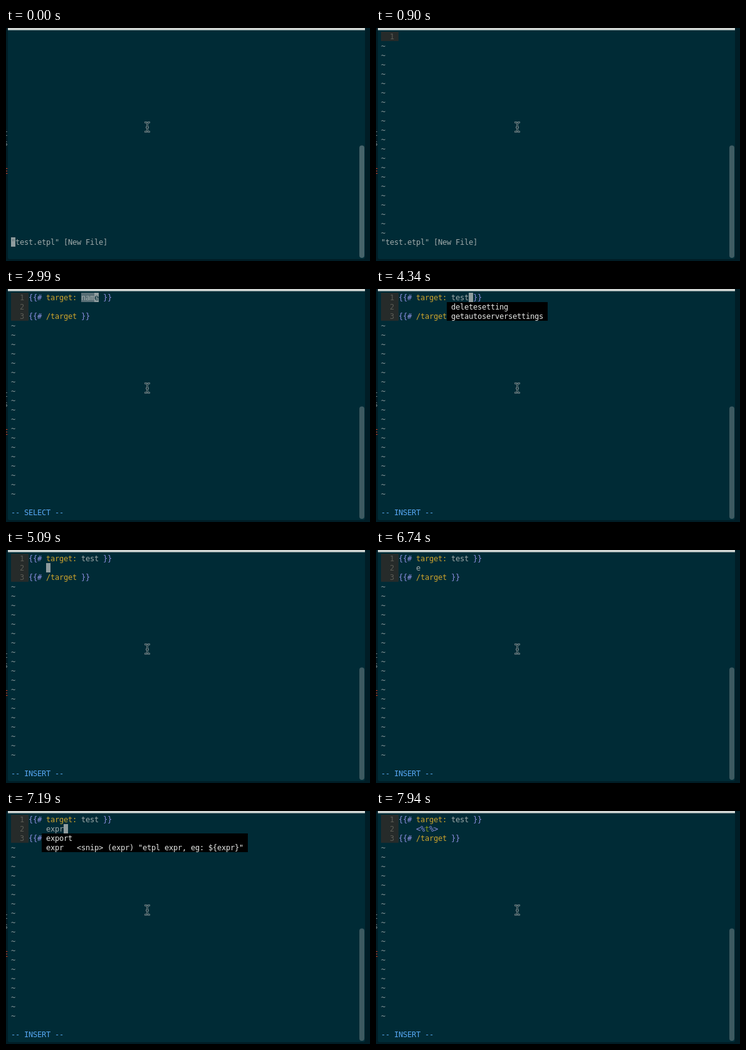
Recreate the animation shown at these times as an HTML page. Size 581 px wide and 374 px high, loop 8000 ms.

```html
<!DOCTYPE html>
<html lang="en">
<head>
<meta charset="utf-8">
<title>Template snippets in the editor</title>
<style>
  html, body { margin: 0; width: 100%; height: 100%; overflow: hidden; background: #001d26; }
  svg { display: block; }
  text { font: 12px "DejaVu Sans Mono", "Liberation Mono", monospace; white-space: pre; }
</style>
</head>
<body>
<svg width="581" height="374" viewBox="0 0 581 374">
  <rect width="581" height="374" fill="#001d26"/>
  <g fill="#75878a">
    <text x="-4" y="173">t</text>
    <text x="-4" y="189">s</text>
    <text x="-4" y="234" fill="#cb4023">E</text>
  </g>
  <path d="M3 0H573V368Q573 371 570 371H6Q3 371 3 368Z" fill="#002b36"/>
  <rect x="3" width="570" height="3.5" fill="#d2d8d5"/>
  <g id="screen"></g>
  <rect id="bar" x="564" y="188.5" width="8" height="180.5" rx="4"/>
  <g fill="none" stroke-linecap="square">
    <path id="beam" d="M222.5 151.5H224L225.5 153L227 151.5H228.5M225.5 153V165M222.5 166.5H224L225.5 165L227 166.5H228.5M224.5 159.5H226.5"
      stroke="#8b9a9d" stroke-width="2.6"/>
    <use href="#beam" id="beamCore"/>
    <path d="M222.5 151.5H224L225.5 153L227 151.5H228.5M225.5 153V165M222.5 166.5H224L225.5 165L227 166.5H228.5M224.5 159.5H226.5"
      stroke="#08242c" stroke-width="1"/>
  </g>
</svg>
<script>
const LOOP = 8000, CELL = 7, ROW = 15, LEFT = 8, TOP = 6, GUTTER = 4;
const C = {
  text: '#a0abab', tilde: '#8c9b9d', violet: '#8c8fe0', yellow: '#cfa52c', green: '#869a1c',
  mode: '#58a9f5', number: '#5b5c55', gutter: '#262b2a', cursor: '#8f9c9e',
  under: '#5d6f73', select: '#586e75', menu: '#000', menuText: '#e6e8e6', base: '#002b36'
};
const NS = 'http://www.w3.org/2000/svg';
const screen = document.getElementById('screen');
const bar = document.getElementById('bar');
document.getElementById('beamCore').remove();

const open = '{{# target: ', close = '{{# /target }}';
const block = (name, body = '') => [`${open}${name} }}`, '    ' + body, close];
const snip = (word, help, pad) => `${word.padEnd(pad)} <snip> (${word}) "etpl ${help}"`;
const exprHelp = 'expr, eg: ${expr}';

// Each step changes only the named parts; cursor and select are [column, row, length].
const steps = [
  [0, { lines: null, msg: '"test.etpl" [New File]', mode: '', cursor: [0, 22], select: null, menu: null, bar: '#46636a' }],
  [150, { lines: [''], cursor: [4, 0], bar: '#4a676e' }],
  [900, { cursor: null, bar: '#3f5c63' }],
  [1050, { bar: '#3d5a61' }],
  [1350, { cursor: [4, 0] }],
  [1650, { mode: 'INSERT' }],
  [2100, { lines: ['t'], cursor: null }],
  [2250, { lines: ['ta'] }],
  [2400, { lines: ['targ'] }],
  [2550, { lines: ['target'] }],
  [2700, { cursor: [10, 0], menu: [3, 1, [snip('target', 'target', 6)]] }],
  [2990, { lines: block('name'), msg: '', mode: 'SELECT', cursor: [19, 0], select: [16, 0, 3], menu: null }],
  [3890, { cursor: null }],
  [4040, { lines: block('t'), mode: 'INSERT', select: null }],
  [4190, { lines: block('test') }],
  [4340, { cursor: [20, 0], menu: [15, 1, ['deletesetting', 'getautoserversettings']] }],
  [4940, { cursor: null }],
  [5090, { cursor: [8, 1], menu: null }],
  [5840, { cursor: null }],
  [6440, { cursor: [8, 1] }],
  [6740, { lines: block('test', 'e'), cursor: null }],
  [7040, { lines: block('test', 'exp'), cursor: [11, 1],
    menu: [7, 2, ['export', snip('expr', exprHelp, 8), 'example', 'explicit', 'expected']] }],
  [7190, { lines: block('test', 'expr'), cursor: [12, 1], menu: [7, 2, ['export', snip('expr', exprHelp, 6)]] }],
  [7490, { lines: block('test', '<%expr%>'), mode: 'SELECT', cursor: [13, 1], select: [10, 1, 3], menu: null }],
  [7940, { lines: block('test', '<%t%>'), mode: 'INSERT', cursor: null, select: null }]
];

const states = [];
for (const [at, change] of steps) {
  states.push({ ...states[states.length - 1], ...change, at });
}

function add(tag, attrs, content) {
  const el = document.createElementNS(NS, tag);
  for (const key in attrs) el.setAttribute(key, attrs[key]);
  if (content) el.textContent = content;
  screen.append(el);
}

function box(col, row, cols, rows, fill) {
  add('rect', { x: LEFT + col * CELL, y: TOP + row * ROW, width: cols * CELL, height: rows * ROW, fill });
}

// One x per character keeps every glyph on the terminal grid.
function put(col, row, str, fill) {
  const x = [...str].map((_, i) => LEFT + (col + i) * CELL).join(' ');
  add('text', { x, y: TOP + row * ROW + 12, fill }, str);
}

function putCode(row, line) {
  const token = /(\{\{#|\}\}|<%|%>)|((?<=# )\/?target:?)|((?<=<%)\w+)|[^{}<%#\s]+|\s+/g;
  for (const m of line.matchAll(token)) {
    const fill = m[1] ? C.violet : m[2] ? C.yellow : m[3] ? C.green : C.text;
    if (m[0].trim()) put(GUTTER + m.index, row, m[0], fill);
  }
}

function draw(s) {
  screen.replaceChildren();
  bar.setAttribute('fill', s.bar);
  if (s.lines) {
    box(0, 0, GUTTER, s.lines.length, C.gutter);
    if (s.select) box(...s.select, 1, C.select);
    s.lines.forEach((line, row) => {
      put(2, row, String(row + 1), C.number);
      putCode(row, line);
    });
    for (let row = s.lines.length; row < 22; row++) put(0, row, '~', C.tilde);
  }
  if (s.msg) put(0, 22, s.msg, C.text);
  if (s.mode) put(0, 23, `-- ${s.mode} --`, C.mode);
  if (s.menu) {
    const [col, row, items] = s.menu;
    box(col, row, Math.max(...items.map(i => i.length)) + 2, items.length, C.menu);
    items.forEach((item, i) => put(col + 1, row + i, item, C.menuText));
  }
  if (s.cursor) {
    const [col, row] = s.cursor;
    box(col, row, 1, 1, C.cursor);
    const under = row === 22 ? s.msg[col] : (s.lines[row] || '')[col - GUTTER];
    if (under && under !== ' ') put(col, row, under, row === 22 ? C.under : C.base);
  }
}

let shown = null;
const start = performance.now();
function tick(now) {
  const t = Math.max(0, now - start) % LOOP;
  const state = states.findLast(s => s.at <= t);
  if (state !== shown) draw(shown = state);
  requestAnimationFrame(tick);
}
tick(start);
</script>
</body>
</html>
```
